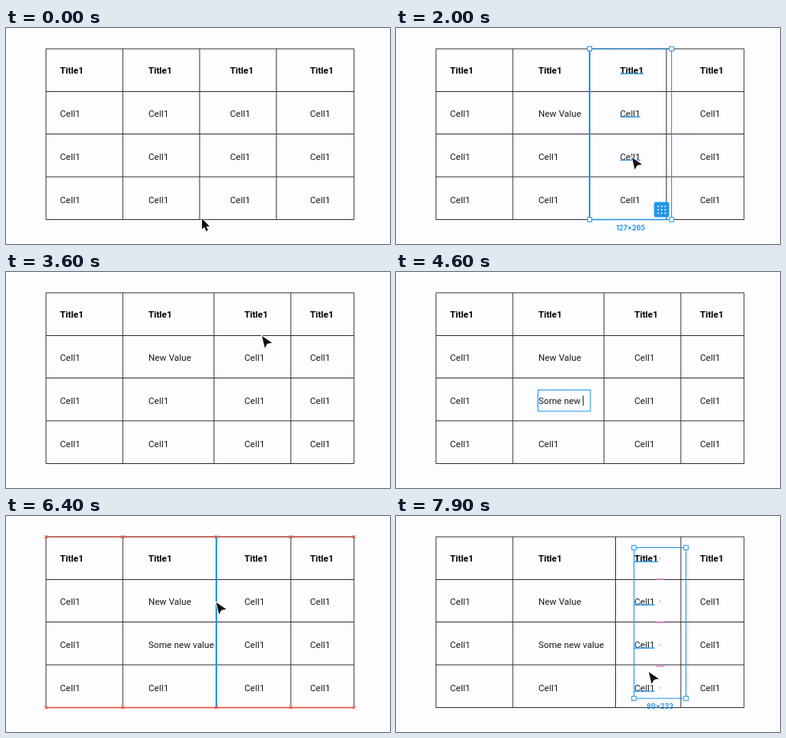
An HTML page that plays this animation: 480 px wide and 270 px high, repeating every 8 s.

```html
<!DOCTYPE html>
<html lang="en">
<head>
<meta charset="utf-8">
<style>
html, body { margin: 0; width: 100%; height: 100%; overflow: hidden; background: #fdfcfe; }
svg { display: block; width: 480px; height: 270px; }
text { font: 11.34px Roboto, sans-serif; fill: #1c1c1e; white-space: pre; }
.title { font-weight: 700; fill: #000; }
.size { font: 600 8.7px Inter, sans-serif; fill: #1a8fe6; text-anchor: middle; }
</style>
</head>
<body>
<svg id="stage" viewBox="0 0 480 270"></svg>
<script>
const BLUE = '#2196e8', RED = '#ee4b3c', PINK = '#f57ad8', INK = '#343438';
const stage = document.getElementById('stage');
const pen = document.createElement('canvas').getContext('2d');
const rowY = [52.5, 106.5, 160.5, 214.5];
const TOP = 26, BOTTOM = 239.5;

// Pointer path: time, x, y
const path = [
  [0, 245, 238], [400, 205, 118], [600, 195, 104], [1400, 225, 98],
  [1500, 242, 72], [1600, 242, 70], [1700, 288, 54], [1850, 290, 108],
  [2000, 295, 162], [2200, 296, 214], [2500, 337, 72], [2700, 333, 57],
  [2900, 333, 57], [3100, 340, 57], [3400, 351, 57], [3600, 320, 80],
  [4000, 198, 158], [5000, 242, 164], [5100, 243, 164], [5400, 275, 164],
  [5500, 278, 130], [5700, 281, 68], [6000, 260, 100], [6300, 260, 108],
  [6800, 274, 108], [7000, 304, 66], [7100, 314, 57], [7200, 314, 56],
  [7400, 312, 108], [7600, 312, 162], [7750, 314, 214], [7900, 316, 195]
];
const shiftKeys = [[2900, 0], [3100, 7.5], [3400, 18]];
const splitKeys = [[6300, 0], [6800, 14.5]];
const growKeys = [[5100, 65.5], [5400, 97.5]];

// Interpolated values of a list of [time, ...values]
function at(keys, t) {
  const i = keys.findIndex(k => k[0] > t);
  if (i < 0) return keys[keys.length - 1].slice(1);
  if (!i) return keys[0].slice(1);
  const a = keys[i - 1], b = keys[i], p = (t - a[0]) / (b[0] - a[0]);
  return a.slice(1).map((v, n) => v + (b[n + 1] - v) * p);
}
const line = (x1, y1, x2, y2, color = INK, w = 1, extra = '') =>
  `<path d="M${x1} ${y1}L${x2} ${y2}" stroke="${color}" stroke-width="${w}" ${extra}/>`;
const rect = (x, y, w, h, fill = 'none', stroke = BLUE, extra = '') =>
  `<rect x="${x}" y="${y}" width="${w}" height="${h}" fill="${fill}" stroke="${stroke}" ${extra}/>`;
const text = (x, y, s, cls = '', extra = '') =>
  `<text x="${x}" y="${y}" class="${cls}" ${extra}>${s}</text>`;
const handle = (x, y) => rect(x - 2.7, y - 2.7, 5.4, 5.4, '#fff');

function width(s, bold) {
  pen.font = `${bold ? 700 : 400} 11.34px Roboto, sans-serif`;
  return pen.measureText(s).width;
}
function selection(x, y, w, h, label) {
  return rect(x, y, w, h) +
    [[x, y], [x + w, y], [x, y + h], [x + w, y + h]].map(p => handle(...p)).join('') +
    text(x + w / 2, y + h + 13, label, 'size');
}
const guides = (cx, cy, top, left) =>
  line(cx, 0, cx, top, BLUE, 1, 'stroke-dasharray="2 1.5"') +
  line(0, cy, left, cy, BLUE, 1, 'stroke-dasharray="2 1.5"');

function lineSelection(x) {
  return line(x, TOP, x, BOTTOM, BLUE, 2) + guides(x, 132.5, TOP, x) +
    handle(x, TOP) + handle(x, BOTTOM) +
    text(0, 0, '265×0', 'size', `transform="translate(288 132.5) rotate(-90)"`.replace('288', x + 13.5));
}
function snapLines(xs) {
  const mark = (x, y) => `<path d="M${x - 2} ${y - 2}l4 4m0-4l-4 4" stroke="${RED}"/>`;
  return line(50, TOP, 435, TOP, RED, 1.2) + line(50, BOTTOM, 435, BOTTOM, RED, 1.7) +
    xs.map(x => mark(x, TOP) + mark(x, BOTTOM)).join('');
}
function gridButton(x) {
  let s = rect(x - 9.5, 217.5, 19, 19, BLUE, 'none', 'rx="2.5"');
  for (let i = 0; i < 9; i++)
    s += rect(x - 5.2 + i % 3 * 4.4, 222.2 + (i / 3 | 0) * 4.2, 1.7, 1.7, '#fff', 'none');
  return s;
}
function pointer(t) {
  const [x, y] = at(path, t);
  const shape = t < 200
    ? 'M0 0V13.5l3-2.8 2.3 5.2 2.2-1-2.2-5h4.2z'
    : 'M0 0L12.5 8.5 6.5 9.8 3.5 15z';
  return `<path d="${shape}" transform="translate(${x} ${y})" fill="#111" stroke="#fff" stroke-width="1.6" paint-order="stroke"/>`;
}

function draw(t) {
  const during = (a, b) => t >= a && t < b;
  const typed = (s, start, step) => t < start ? 'Cell1'
    : s.slice(0, Math.max(0, Math.round((t - start) / step)));
  const [shift] = at(shiftKeys, t), [split] = at(splitKeys, t), [boxW] = at(growKeys, t);
  const xs = [50, 146, 242 + shift + split, 338 + shift, 435];
  const cols = [67.5, 178, 280 + shift, 380];
  const value = typed('New Value', 750, 60), note = typed('Some new value', 4150, 50);
  const content = (r, c) => !r ? 'Title1' : c === 1 && r === 1 ? value : c === 1 && r === 2 ? note : 'Cell1';
  const underline = (r, c) => {
    const s = content(r, c);
    return line(cols[c], rowY[r] + 4.6, cols[c] + width(s, !r), rowY[r] + 4.6, BLUE, 1.3);
  };
  let s = '';

  for (const x of xs) s += line(x, TOP, x, BOTTOM);
  for (const y of [26, 79.5, 132.5, 186, 239.5]) s += line(50, y, 435, y);
  rowY.forEach((y, r) => cols.forEach((x, c) => {
    s += text(x, y + 4, content(r, c), r ? '' : 'title');
  }));

  // Editing the two cells
  const edit = (r, str) => {
    const x = 178.5 + width(str);
    return rect(177.5, rowY[r] - 13, 65.5, 26.5) +
      line(x, rowY[r] - 6, x, rowY[r] + 6.5, '#111');
  };
  if (during(600, 1400)) s += edit(1, value);
  if (during(4000, 5000)) s += edit(2, note);
  if (during(1400, 1500))
    s += underline(1, 1) + guides(210.5, 106.5, 93.5, 178) + selection(177.5, 93.5, 65.5, 26.5, '80×32');
  if (during(5000, 6100))
    s += underline(2, 1) + guides(177.5 + boxW / 2, 160.5, 147.5, 178) +
      selection(177.5, 147.5, boxW, 26.5, Math.round(boxW / .811) + '×32');
  if (during(5600, 5900)) s += line(50, 79.5, 435, 79.5, BLUE, 2);

  // Building up and moving the third column
  if (during(1500, 1700)) s += lineSelection(xs[2]);
  const dragging = during(2900, 3500);
  if (during(1700, 3600) && !dragging) {
    const picked = t < 1800 ? 1 : t < 2000 ? 2 : t < 2200 ? 3 : 4;
    if (t < 2700) for (let r = 0; r < picked; r++) s += underline(r, 2);
    s += line(xs[2], TOP, xs[2], BOTTOM, BLUE, 2) + line(xs[2], BOTTOM, xs[2] + 102.5, BOTTOM, BLUE, 1.5);
    if (t >= 2600) s += line(xs[3], TOP, xs[3], BOTTOM, BLUE, 2);
    s += selection(xs[2], TOP, 102.5, BOTTOM - TOP, '127×265');
  }
  if (dragging) s += snapLines(xs);
  if (during(1800, 3600)) s += gridButton(cols[2] + 52);

  // Moving the divider
  if (during(6100, 7200)) s += during(6300, 6900)
    ? line(xs[2], TOP, xs[2], BOTTOM, BLUE, 2) + snapLines(xs)
    : lineSelection(xs[2]);
  if (during(7100, 7200)) s += underline(0, 2);

  // Picking the column's labels
  if (t >= 7200) {
    const n = t < 7400 ? 0 : t < 7600 ? 1 : t < 7800 ? 2 : 3;
    const x = cols[2] - .5, y = 39.5, h = rowY[n] - rowY[0] + 26.5;
    for (let r = 0; r <= n; r++) {
      s += underline(r, 2);
      if (n) s += rect(x + 32, rowY[r] - .5, 1.5, 1.5, PINK, 'none');
      if (r) s += line(x + 27.5, [79, 133, 188][r - 1], x + 38, [79, 133, 188][r - 1], PINK, 1.4);
    }
    if (!n) s += guides(x + 32.5, 52.5, y, x);
    s += selection(x, y, 65, h, '80×' + [32, 99, 166, 233][n]);
  }

  if (!during(700, 1400) && !during(4100, 5000)) s += pointer(t);
  stage.innerHTML = s;
}

let last = -1;
function tick(now) {
  const t = Math.floor(now % 8000 / 100) * 100;
  if (t !== last) draw(last = t);
  requestAnimationFrame(tick);
}
draw(0);
requestAnimationFrame(tick);
</script>
</body>
</html>
```
